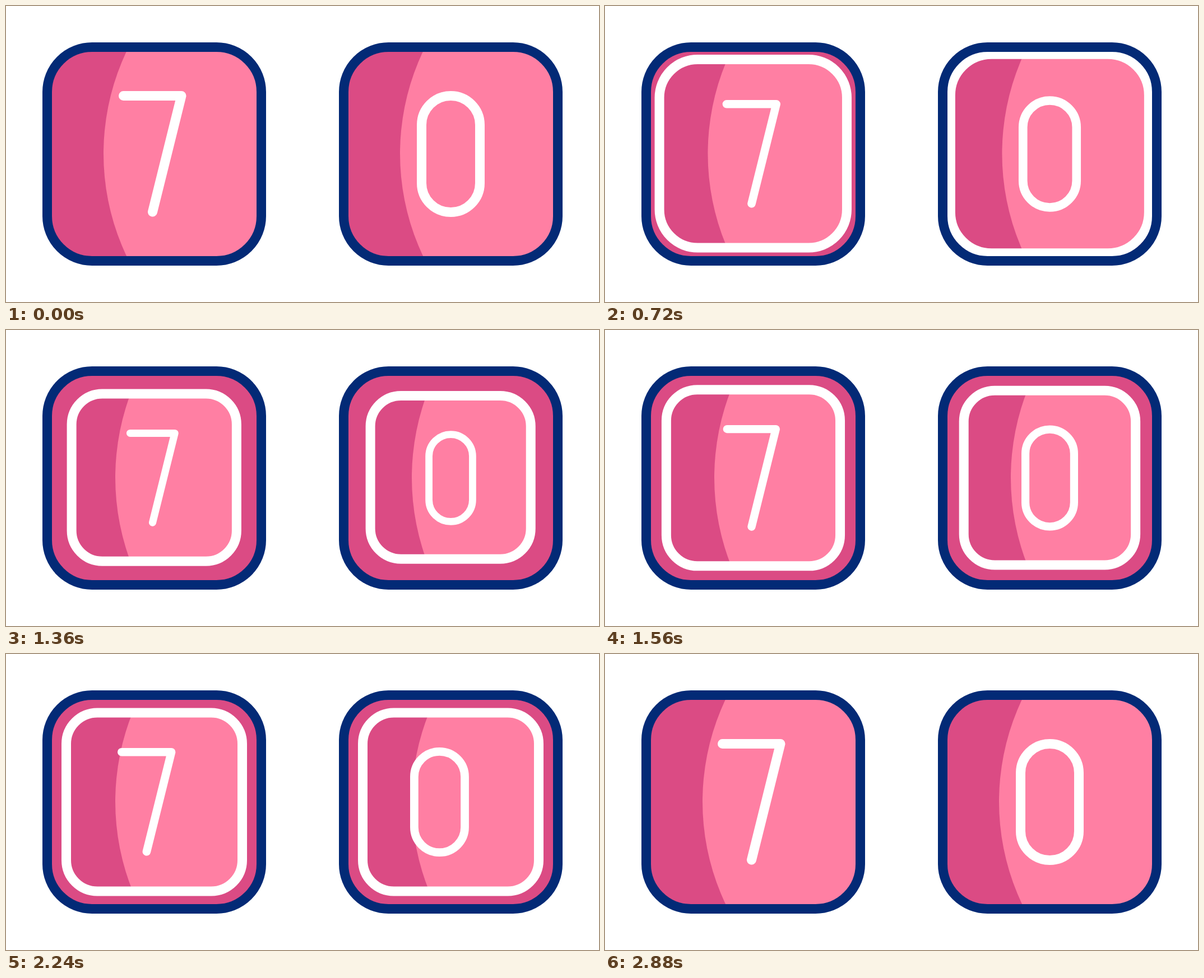
These frames come from a looping animation (1058 px wide and 529 px high, 3 s). An HTML page:

```html
<!DOCTYPE html>
<html lang="en">
<head>
<meta charset="utf-8">
<title>Seven and zero</title>
<style>
  html, body { margin: 0; width: 100%; height: 100%; overflow: hidden; background: #fff; }
  svg { display: block; width: 100%; height: 100%; }
  .base { fill: #db4b84; }
  .light { fill: #ff7fa3; }
  .line { fill: none; stroke: #fff; stroke-width: 17; stroke-linecap: round; stroke-linejoin: round; }
  .rim { fill: none; stroke: #032a76; stroke-width: 17; }
</style>
</head>
<body>
<svg id="stage" viewBox="0 0 1058 529"></svg>
<script>
const LOOP = 3000, TICK = 40, SLIDE = 400;

// Poses: half width, half height, corner radius, centre x, centre y, shade edge x, digit scale
const REST = [191.5, 191.5, 80, 264.5, 264.5, 174, 1];

const cards = [
  {
    x: 0, pivot: 261.5,
    digit: '<path class="line" d="M-52 -104H51.5L0 103.5"/>',
    small: [137.5, 140, 54, 264, 262.8, 195, .684],
    middle: [157, 159.5, 55.5, 264.5, 264.4, 195, .858],
    shrink: [440, 1040], grow: [1040, 1685], slide: [1720, 2296], back: [2240, 2840]
  },
  {
    x: 529, pivot: 264.5,
    digit: '<rect class="line" x="-52" y="-104" width="104" height="208" rx="52"/>',
    small: [135.5, 138.5, 54, 264, 262.8, 195, .684],
    middle: [157, 159.5, 55.5, 264.5, 264.4, 195, .867],
    shrink: [520, 1120], grow: [1120, 1720], slide: [1768, 2314], back: [2280, 2880]
  }
];

const stage = document.getElementById('stage');
stage.innerHTML = cards.map((card, i) => {
  const frame = 'x="73.5" y="73.5" width="382" height="382" rx="80"';
  return `<g transform="translate(${card.x})">
    <clipPath id="clip${i}"><rect class="box"/></clipPath>
    <rect class="base" ${frame}/>
    <g clip-path="url(#clip${i})">
      <circle class="light" cy="264" r="428"/>
      <g class="digit">${card.digit}</g>
    </g>
    <rect class="box line"/>
    <rect class="rim" ${frame}/>
  </g>`;
}).join('');

cards.forEach((card, i) => {
  const group = stage.children[i];
  card.boxes = group.querySelectorAll('.box');
  card.light = group.querySelector('.light');
  card.digitNode = group.querySelector('.digit');
});

function ease(time, [start, end]) {
  const p = Math.min(1, Math.max(0, (time - start) / (end - start)));
  return p * p * (3 - 2 * p);
}

function mix(from, to, p) {
  return from.map((value, i) => value + (to[i] - value) * p);
}

function setAttributes(node, values) {
  for (const name in values) node.setAttribute(name, values[name]);
}

function drawCard(card, time) {
  let pose = mix(REST, card.small, ease(time, card.shrink));
  pose = mix(pose, card.middle, ease(time, card.grow));
  pose = mix(pose, REST, ease(time, card.back));
  const [halfW, halfH, radius, cx, cy, edge, scale] = pose;

  for (const box of card.boxes) {
    setAttributes(box, {
      x: cx - halfW, y: cy - halfH, width: 2 * halfW, height: 2 * halfH, rx: radius
    });
  }
  card.light.setAttribute('cx', edge + 428);

  // The digit leaves on the right and comes back in from the left.
  const travel = ease(time, card.slide);
  const shift = SLIDE * (travel < .5 ? travel : travel - 1);
  card.digitNode.setAttribute('transform',
    `translate(${card.pivot + shift} 264.5) scale(${scale})`);
}

function draw(now) {
  const time = Math.floor((now % LOOP) / TICK) * TICK;
  cards.forEach(card => drawCard(card, time));
}

let origin;
function loop(now) {
  origin ??= now;
  draw(now - origin);
  requestAnimationFrame(loop);
}
draw(0);
requestAnimationFrame(loop);
</script>
</body>
</html>
```
